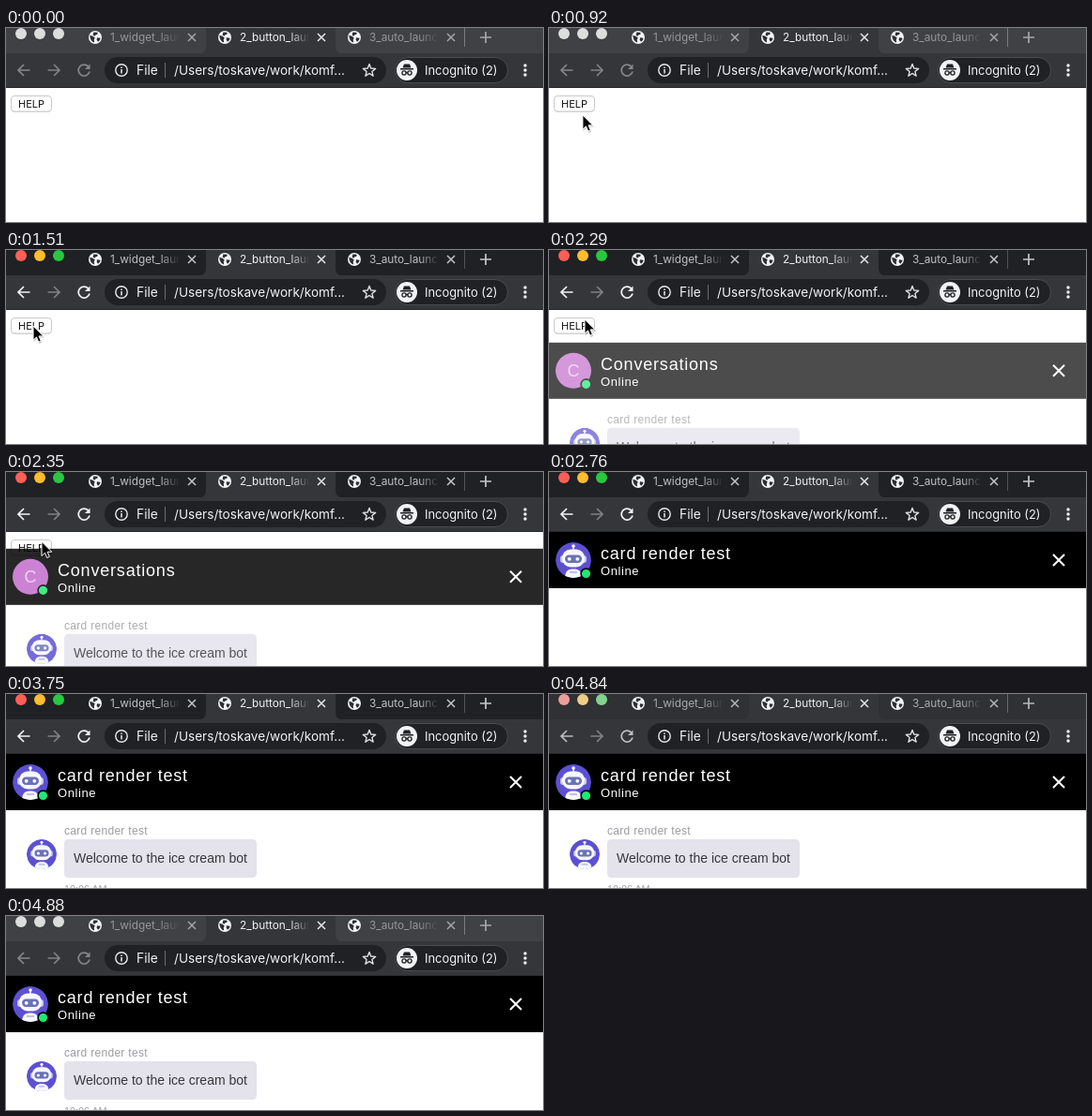
Animation of 572x207 px, one loop 5 s. Source, as an HTML page:

```html
<!DOCTYPE html>
<html lang="en">
<head>
<meta charset="utf-8">
<title>Chat widget launch</title>
<style>
html, body { margin: 0; width: 100%; height: 100%; overflow: hidden; background: #fff; }
svg { display: block; width: 572px; height: 207px; }
.ui { font-family: Inter, Roboto, sans-serif; }
.chat { font-family: "Liberation Sans", Arial, sans-serif; }
.line { fill: none; stroke-width: 1.7; }
</style>
</head>
<body>
<svg id="stage" viewBox="0 0 572 207" xmlns="http://www.w3.org/2000/svg">
  <defs>
    <linearGradient id="fade" gradientUnits="userSpaceOnUse" x1="0" y1="0" x2="74" y2="0">
      <stop offset=".72" stop-color="#fff"/><stop offset="1" stop-color="#fff" stop-opacity="0"/>
    </linearGradient>
    <mask id="titleMask" maskUnits="userSpaceOnUse" x="0" y="-14" width="74" height="22">
      <rect y="-14" width="74" height="22" fill="url(#fade)"/>
    </mask>
    <linearGradient id="pressed" x1="0" y1="0" x2="0" y2="1">
      <stop offset="0" stop-color="#6cb1fa"/><stop offset="1" stop-color="#146ef6"/>
    </linearGradient>
    <clipPath id="round"><circle r="19"/></clipPath>
    <g id="globe">
      <circle r="7" fill="#f4f5f6"/>
      <path d="M-5.6 -2.2L-2.5 -1.2L-.2 .6L-1.2 2.2L-.9 5.6C-4 4.6-5.7 2-5.6-2.2z M-1.6 -5.6L2.6 -5.2L2.4 -3.2L.2 -2.6L-.6 -1.2L-2.4 -2.6z M2 .2L5.6 .8C5.2 2.6 4.2 4 3 4.8L1.6 2.6z" fill="#2c2d31"/>
    </g>
    <g id="bot" clip-path="url(#round)">
      <circle r="19" fill="#5c50d2"/>
      <path d="M0 -11V-15" stroke="#fff" stroke-width="1.4"/>
      <circle cy="-15" r="1.8" fill="#fff"/>
      <rect x="-14" y="-5" width="28" height="8" rx="3" fill="#c9cbee"/>
      <rect x="-12" y="-11.5" width="24" height="19" rx="9" fill="#f7f7fd"/>
      <rect x="-9" y="-5.5" width="18" height="8.5" rx="4.2" fill="#6a72b8"/>
      <circle cx="-4.3" cy="-1.2" r="1.9" fill="#fff"/>
      <circle cx="4.3" cy="-1.2" r="1.9" fill="#fff"/>
      <path d="M-9 20C-9 12-6 9.5 0 9.5S9 12 9 20z" fill="#f7f7fd"/>
      <path d="M-4 13H4" stroke="#aeb2e2" stroke-width="1.6"/>
    </g>
  </defs>

  <rect width="572" height="207" fill="#fff"/>

  <g id="button" class="ui">
    <rect x="5.5" y="73" width="43" height="17" rx="4" fill="#000" opacity=".12"/>
    <rect id="face" x="5.5" y="72.5" width="43" height="16.5" rx="3.5" stroke="#c9c9c9" stroke-width="1"/>
    <text id="help" x="13" y="85" font-size="11">HELP</text>
  </g>

  <g id="widget" class="chat">
    <rect y="64" width="572" height="190" fill="#fff"/>
    <rect y="64" width="572" height="60" fill="#000"/>
    <g id="letter">
      <circle cx="26" cy="94" r="19" fill="#c36ccb"/>
      <text x="26" y="100.3" font-size="18" text-anchor="middle" fill="#ecc9f0">C</text>
    </g>
    <use id="headBot" href="#bot" x="26" y="94"/>
    <circle cx="39.5" cy="108.5" r="5.4" fill="#1fe874" stroke="#000" stroke-width="1.6"/>
    <text id="title" x="55" y="93" font-size="18" letter-spacing=".8" fill="#fff"></text>
    <text x="55" y="110" font-size="13" letter-spacing=".6" fill="#fff">Online</text>
    <path d="M537 88L549 100M549 88L537 100" stroke="#fff" stroke-width="2"/>
    <g id="message">
      <text x="62" y="150" font-size="12" letter-spacing=".3" fill="#9c9ba0">card render test</text>
      <use href="#bot" transform="translate(38 171) scale(.842)"/>
      <rect x="62" y="155" width="205" height="41" rx="4.5" fill="#e4e2eb"/>
      <text x="72" y="180" font-size="14" fill="#37363b">Welcome to the ice cream bot</text>
      <text x="62" y="211.5" font-size="10.8" fill="#a3a2a7">10:06 AM</text>
    </g>
  </g>

  <g id="browser" class="ui">
    <rect id="frame" width="572" height="28"/>
    <rect y="27" width="572" height="37" fill="#35363a"/>
    <path d="M205 27.5Q213 27.5 213 19V0H351V19Q351 27.5 359 27.5z" fill="#35363a"/>
    <rect y="63" width="572" height="1" fill="#28292c"/>
    <g id="lights"></g>
    <g id="tabs"></g>
    <path id="divider" d="M488.5 0V20"/>
    <path id="plus" class="line" d="M505 10H517M511 4V16"/>

    <path id="back" class="line" d="M25.5 45H13.5M19 39L13 45L19 51"/>
    <path class="line" stroke="#808186" d="M44.500 45H56.500M51 39L57 45L51 51"/>
    <g id="reload">
      <path class="line" d="M87.600 41A6 6 0 1 0 89 46.500"/>
      <path class="tip" d="M89.500 38.500V44H84z"/>
    </g>

    <rect x="105" y="31" width="300" height="28" rx="14" fill="#202124"/>
    <circle cx="123" cy="45" r="6.200" class="line" stroke="#e8eaed" style="stroke-width:1.400"/>
    <path d="M123 44V48.500M123 41.500V43" stroke="#e8eaed" stroke-width="1.500"/>
    <text x="139" y="50" font-size="13.800" fill="#f1f3f4">File</text>
    <path d="M169.500 37V53" stroke="#6a6c70"/>
    <text x="179" y="50" font-size="13.600" fill="#f1f3f4">/Users/toskave/work/komf...</text>
    <path id="star" class="line" stroke="#dfe1e5" style="stroke-width:1.400" stroke-linejoin="round"/>

    <rect x="414.500" y="31.500" width="120" height="27" rx="13.500" fill="#202124" stroke="#4a4b4f"/>
    <circle cx="427" cy="45" r="11" fill="#f1f3f4"/>
    <g fill="#202124">
      <path d="M422.500 42.500L424 38.500H430L431.500 42.500z"/>
      <rect x="420" y="43" width="14" height="1.500"/>
    </g>
    <g class="line" stroke="#202124" style="stroke-width:1.300">
      <circle cx="424" cy="48" r="2.100"/><circle cx="430" cy="48" r="2.100"/>
      <path d="M426 47.500H428"/>
    </g>
    <text x="446" y="50" font-size="12.900" fill="#f1f3f4">Incognito (2)</text>
    <g fill="#f1f3f4">
      <circle cx="553" cy="40" r="1.700"/><circle cx="553" cy="45" r="1.700"/><circle cx="553" cy="50" r="1.700"/>
    </g>
  </g>

  <g id="cursor">
    <path d="M.5 1.500V17L4.200 13.500L6.500 19L9.300 17.800L7 12.500H12z" fill="#000" opacity=".22"/>
    <path d="M0 0V15.200L3.500 11.900L5.700 17.200L8.300 16.100L6.100 10.900H10.800z" fill="#000" stroke="#fff" stroke-width="1"/>
  </g>
</svg>
<script>
const LOOP = 5000;
const $ = id => document.getElementById(id);
const set = (el, attrs) => { for (const k in attrs) el.setAttribute(k, attrs[k]); };
const show = (el, on) => set(el, { visibility: on ? "visible" : "hidden" });

function mix(a, b, k) {
  const part = (c, i) => parseInt(c.slice(i, i + 2), 16);
  return "rgb(" + [1, 3, 5].map(i => Math.round(part(a, i) + (part(b, i) - part(a, i)) * k)) + ")";
}

// Static parts built from rules
const lightColors = ["#ff5f57", "#febc2e", "#28c840"];
$("lights").innerHTML = lightColors.map((c, i) => `<circle cx="${16 + 20 * i}" cy="6" r="6"/>`).join("");

$("tabs").innerHTML = ["1_widget_launch", "2_button_launch", "3_auto_launch"].map((name, i) => `
  <g transform="translate(${95 + 138 * i} 10)">
    <use href="#globe"/>
    <g transform="translate(16 4)" mask="url(#titleMask)"><text font-size="11.8">${name}</text></g>
    <path class="line" style="stroke-width:1.5" d="M99 -4L107 4M107 -4L99 4"/>
  </g>`).join("");

$("star").setAttribute("d", "M" + Array.from({ length: 10 }, (_, i) => {
  const r = i % 2 ? 3 : 7, a = -Math.PI / 2 + i * Math.PI / 5;
  return (387 + r * Math.cos(a)).toFixed(2) + " " + (45.5 + r * Math.sin(a)).toFixed(2);
}).join("L") + "z");

// Window focus: 0 = background, 1 = foreground
function focusAt(t) {
  if (t < 1480 || t >= 4880) return 0;
  return t < 1510 || t >= 4840 ? 0.5 : 1;
}

function drawBrowser(k) {
  const icon = mix("#85868a", "#f1f3f4", k);
  set($("frame"), { fill: mix("#3f4144", "#202124", k) });
  [...$("lights").children].forEach((c, i) => set(c, { fill: mix("#dddddd", lightColors[i], k) }));
  [...$("tabs").children].forEach((tab, i) => {
    const on = i === 1;
    set(tab.querySelector("text"), { fill: on ? "#f1f3f4" : mix("#94979b", "#bdc1c6", k) });
    set(tab.querySelector("path"), { stroke: on ? "#e8eaed" : mix("#a4a7ab", "#c4c7cb", k) });
  });
  set($("divider"), { stroke: mix("#797c80", "#505357", k) });
  set($("plus"), { stroke: mix("#a4a7ab", "#c4c7cb", k) });
  set($("back"), { stroke: icon });
  set($("reload").querySelector(".line"), { stroke: icon });
  set($("reload").querySelector(".tip"), { fill: icon });
}

function cursorAt(t) {
  if (t < 540 || t > 2745) return null;
  if (t < 1060) {
    const left = (1060 - t) / 530;
    return [29 + 24 * left ** 0.93, 81 + 124 * left ** 1.75];
  }
  if (t < 2290) {
    const u = Math.min(1, Math.max(0, (t - 1880) / 110));
    return [29 + 9 * u, 81 - 7 * u];
  }
  return [38, 74 + 4 * ((t - 2290) / 140) ** 3];
}

function drawWidget(t) {
  const open = t >= 2290, loaded = t >= 2700;
  const left = (Math.max(0, 2502 - t) / 383.6) ** 2;
  set($("widget"), {
    display: open ? "inline" : "none",
    opacity: 1 - left,
    transform: `translate(0 ${115 * left})`
  });
  $("title").textContent = loaded ? "card render test" : "Conversations";
  set($("letter"), { display: loaded ? "none" : "inline" });
  set($("headBot"), { display: loaded ? "inline" : "none" });
  set($("message"), { display: !loaded || t >= 3750 ? "inline" : "none" });
}

function render(t) {
  drawBrowser(focusAt(t));
  const down = t >= 2140 && t < 2290;
  set($("face"), { fill: down ? "url(#pressed)" : "#fff", stroke: down ? "#2f78e6" : "#c9c9c9" });
  set($("help"), { fill: down ? "#fff" : "#111" });
  drawWidget(t);
  const pos = cursorAt(t);
  show($("cursor"), pos);
  if (pos) set($("cursor"), { transform: `translate(${pos[0]} ${pos[1]})` });
}

const start = performance.now();
function tick() {
  render((performance.now() - start) % LOOP);
  requestAnimationFrame(tick);
}
tick();
</script>
</body>
</html>
```
